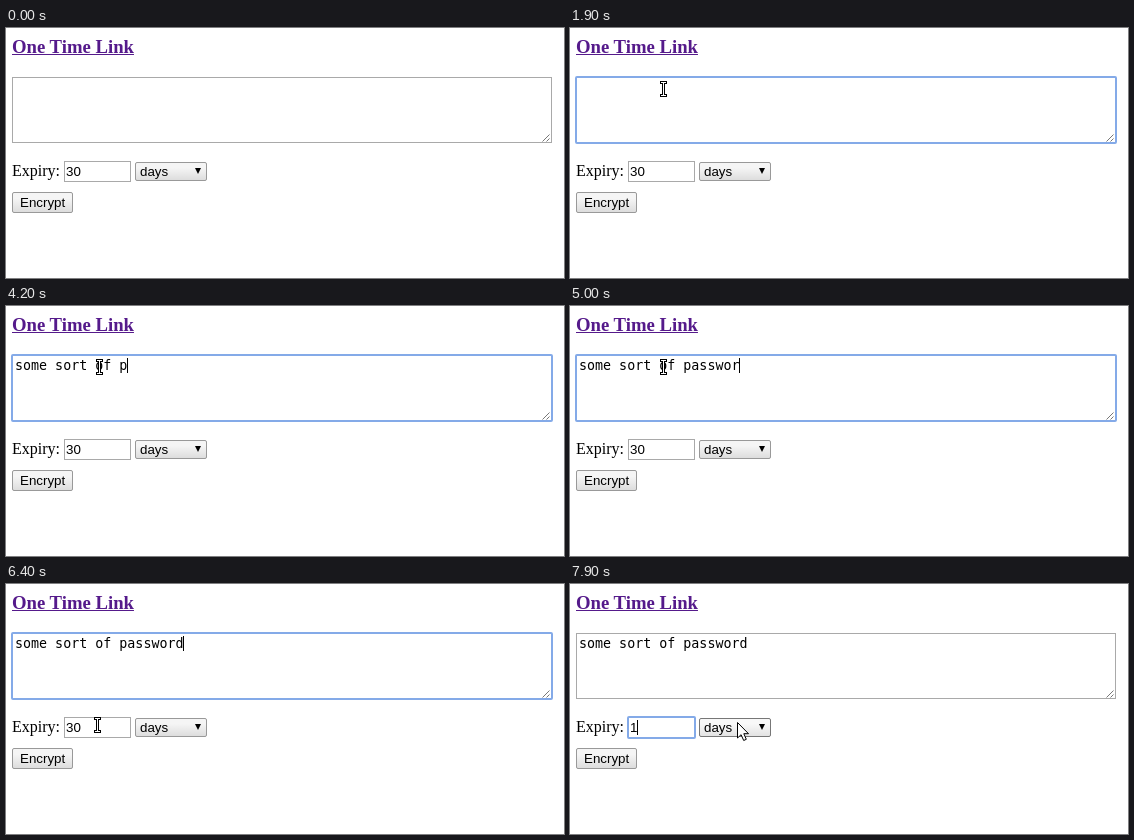
Recreate the animation shown at these times as an HTML page. Size 558 px wide and 250 px high, loop 8 s.

```html
<!DOCTYPE html>
<html lang="en">
<head>
<meta charset="utf-8">
<title>One Time Link</title>
<style>
  html, body { margin: 0; width: 558px; height: 250px; overflow: hidden; background: #fff; }
  svg { position: absolute; left: 0; top: 0; }
  p, h3 { position: absolute; margin: 0; white-space: pre; }
  .serif { font: 16px/17px "Liberation Serif", serif; }
  .sans { font: 13.333px/15px "Liberation Sans", sans-serif; }
  .mono { font: 13.333px/15px "DejaVu Sans Mono", monospace; }
  h3 {
    font: bold 18.72px/21px "Liberation Serif", serif; color: #551a8b;
    text-decoration: underline 1px; text-underline-offset: 1px; text-decoration-skip-ink: none;
  }
  #picked { color: #fff; background: #3c8be8; }
  .field { fill: #fff; stroke: #a9a9a9; }
  .button { fill: url(#face); stroke: #999; }
  .button.hover { fill: url(#lit); stroke: #777; }
  .ring { fill: none; stroke: #84aae8; stroke-width: 2; }
  .grip { fill: none; stroke: #777; }
  .arrow, .hand { fill: #fff; stroke: #000; stroke-linejoin: round; }
  .beam { fill: none; stroke: #000; stroke-width: 3; stroke-linecap: square; }
  .beam.core { stroke: #fff; stroke-width: 1; }
</style>
</head>
<body>
<svg width="558" height="250" viewBox="0 0 558 250">
  <defs>
    <linearGradient id="face" x2="0" y2="1">
      <stop offset="0.3" stop-color="#f5f5f5"/><stop offset="1" stop-color="#dcdcdc"/>
    </linearGradient>
    <linearGradient id="lit" x2="0" y2="1">
      <stop offset="0.3" stop-color="#f8f8f8"/><stop offset="1" stop-color="#e2e2e2"/>
    </linearGradient>
  </defs>

  <rect class="field" x="6.5" y="49.5" width="539" height="65"/>
  <path class="grip" d="M536.5 113.5L543.5 106.5M540.5 113.5L543.5 110.5"/>
  <rect class="ring" id="areaRing" x="6" y="49" width="540" height="66" rx="1"/>

  <rect class="field" x="58.5" y="133.5" width="66" height="20"/>
  <rect class="ring" id="inputRing" x="58" y="133" width="67" height="21" rx="1"/>

  <rect class="button" id="unit" x="129.5" y="134.5" width="71" height="18" rx="1.5"/>
  <path d="M189 140H195L192 146Z"/>
  <rect class="button" x="6.5" y="164.5" width="60" height="20" rx="1.5"/>
</svg>

<h3 style="left:6px;top:8px">One Time Link</h3>
<p class="mono" id="note" style="left:9px;top:52px"></p>
<p class="serif" style="left:6px;top:134px">Expiry:</p>
<p class="sans" style="left:60px;top:136px"><span id="plain"></span><span id="picked"></span></p>
<p class="sans" style="left:134px;top:136px">days</p>
<p class="sans" style="left:14px;top:167px">Encrypt</p>

<svg width="558" height="250" viewBox="0 0 558 250">
  <defs><path id="ibeam" d="M-2-6.5H2M0-6.5V6.5M-2 6.5H2"/></defs>
  <rect id="caret" width="1" height="15"/>
  <g id="pointer">
    <g id="text">
      <use href="#ibeam" class="beam"/>
      <use href="#ibeam" class="beam core"/>
    </g>
    <path id="arrow" class="arrow" d="M0 0V15.5L3.6 12.2L6.2 18L8.8 16.8L6.3 11.2H11Z"/>
    <path id="hand" class="hand" d="M-1.5 1Q0-1 1.5 1V6.5Q3 5 4.5 7Q6 6 7.3 8Q9.5 7 9.8 9.5V13Q9.5 16 8 18H0Q-2-1 -2 14L-5 10Q-5 8-3.5 8.5L-1.5 10.5Z"/>
  </g>
</svg>
<script>
const LOOP = 8000, STEP = 100, BLINK = 500;
const MONO = 8.027, DIGIT = 7.415, INPUT_X = 60, AREA_X = 9;
const FOCUS_AREA = 1300, FOCUS_INPUT = 6500, RETYPE = 7500;
const $ = id => document.getElementById(id);

// One entry per key press: time, resulting text
const keys = [[1400, ""]];
function type(start, letters) {
  [...letters].forEach((c, i) => keys.push([start + i * STEP, keys.at(-1)[1] + c]));
}
type(2000, "somw");
keys.push([2800, "som"]);
type(2900, "e ");
type(3200, "so");
type(3500, "rt of ");
type(4200, "pas");
type(4600, "s");
type(4800, "wor");
type(5200, "d");

// Pointer: time, x, y, shape
const path = [
  [300, 93, 2, "arrow"], [400, 94, 14, "hand"], [500, 93, 31, "arrow"],
  [600, 92.5, 51, "text"], [700, 93.5, 59, "text"], [800, 93.5, 61, "text"],
  [5800, 78.5, 92, "text"], [5900, 64.5, 116, "text"], [6000, 68, 127, "arrow"],
  [6100, 75.5, 138, "text"], [6200, 84.5, 142, "text"], [6300, 89.5, 142, "text"],
  [6400, 91.5, 141, "text"], [6600, 82.5, 141, "text"], [6700, 70.5, 140, "text"],
  [6800, 62.5, 140, "text"], [6900, 59.5, 140, "text"], [7000, 58.5, 140, "text"],
  [7700, 95.5, 141, "text"], [7800, 150, 138.5, "arrow"], [7900, 167.5, 138.5, "arrow"]
];

const latest = (list, t) => list.findLast(e => e[0] <= t);
const show = (id, on) => $(id).setAttribute("display", on ? "inline" : "none");
const lit = (t, since) => Math.floor((t - since) / BLINK) % 2 === 0;

function drawPointer(at) {
  show("pointer", !!at);
  const [, x, y, shape] = at || [0, 0, 0, "arrow"];
  $("pointer").setAttribute("transform", `translate(${x} ${y})`);
  for (const s of ["text", "arrow", "hand"]) show(s, s === shape);
  $("unit").classList.toggle("hover", x > 129 && y > 134);
}

function placeCaret(on, x, y) {
  show("caret", on);
  $("caret").setAttribute("x", Math.floor(x));
  $("caret").setAttribute("y", y);
}

function draw(time) {
  const t = Math.floor(time % LOOP / STEP) * STEP;
  const inArea = t >= FOCUS_AREA && t < FOCUS_INPUT, inInput = t >= FOCUS_INPUT;
  const at = latest(path, t), key = latest(keys, t) || [FOCUS_AREA, ""];
  show("areaRing", inArea);
  show("inputRing", inInput);
  $("note").textContent = key[1];

  // Dragging left from the end of the number selects its digits
  const value = t < RETYPE ? "30" : "1";
  let from = value.length;
  if (inInput && t < RETYPE) {
    from = Math.max(0, Math.min(from, Math.round((at[1] - INPUT_X) / DIGIT)));
  }
  $("plain").textContent = value.slice(0, from);
  $("picked").textContent = value.slice(from);

  if (inInput) {
    const since = t < RETYPE ? FOCUS_INPUT : RETYPE;
    placeCaret(from === value.length && lit(t, since), INPUT_X + from * DIGIT, 136);
  } else {
    placeCaret(inArea && lit(t, key[0]), AREA_X + key[1].length * MONO, 52);
  }
  drawPointer(at);
}

const start = performance.now();
function tick() {
  draw(performance.now() - start);
  requestAnimationFrame(tick);
}
tick();
</script>
</body>
</html>
```
